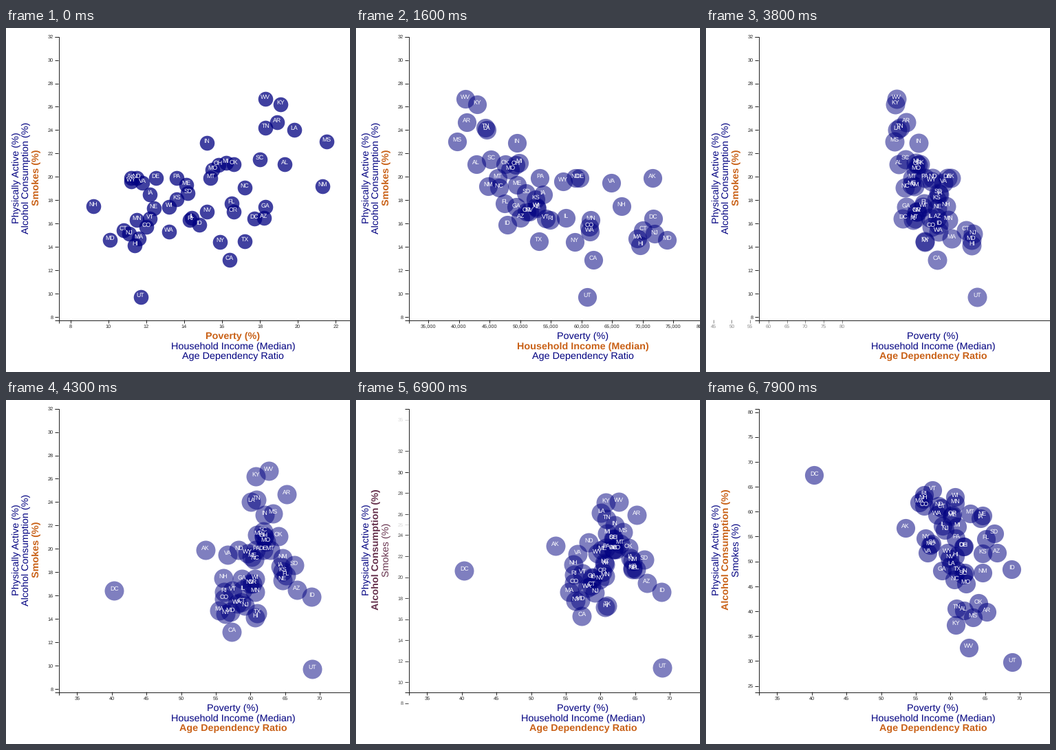
A matplotlib script that plays this animation: 500x500 px, repeating every 8000 ms.

```python
import matplotlib.pyplot as plt
import numpy as np
from matplotlib.animation import FuncAnimation

SIZE, DPI = 500, 100
FRAMES, STEP = 80, 100
PT = 72 / DPI  # points per pixel
LEFT, BOTTOM, TOP, PLOT_W = 76, 424, 12, 508
NAVY = np.array([0, 0, 0.5])
ORANGE = np.array([0.79, 0.38, 0.09])
INK = "#222222"
MOVE, FADE, SETTLE = 1000, 350, 550
TO_INCOME, TO_AGE, TO_ALCOHOL = 424, 3271, 6725
NEVER, ALWAYS = 1e9, -1e9

plt.rcParams["font.family"] = "Liberation Sans"
plt.rcParams["text.hinting"] = "none"

STATES = ("AL AK AZ AR CA CO CT DE DC FL GA HI ID IL IN IA KS KY LA ME MD MA MI MN "
          "MS MO MT NE NV NH NJ NM NY NC ND OH OK OR PA RI SC SD TN TX UT VT VA WA "
          "WV WI WY").split()

poverty = np.array([
    19.3, 11.2, 18.2, 18.9, 16.4, 12, 10.8, 12.5, 17.7, 16.5, 18.3, 11.4, 14.8,
    14.4, 15.2, 12.2, 13.6, 19.1, 19.8, 14.1, 10.1, 11.6, 16.2, 11.5, 21.5, 15.5,
    15.4, 12.4, 15.2, 9.2, 11.1, 21.3, 15.9, 17.2, 11.5, 15.8, 16.6, 16.6, 13.6,
    14.3, 18, 14.2, 18.3, 17.2, 11.7, 12.2, 11.8, 13.2, 18.3, 13.2, 11.2])
income = np.array([
    42830, 71583, 50068, 41262, 61933, 61303, 70048, 59716, 71648, 47463, 49321,
    69592, 47861, 57444, 49446, 53712, 52504, 42958, 44555, 49462, 73971, 69160,
    49847, 61481, 39680, 48363, 46328, 52686, 51450, 66532, 71919, 44803, 58878,
    46556, 59029, 49308, 47529, 51075, 53234, 54891, 45238, 50979, 44361, 53035,
    60922, 54166, 64902, 61366, 41059, 52622, 57055])
age = np.array([
    61.9, 53.5, 66.7, 65.2, 57.3, 56.2, 58.7, 61.8, 40.35, 65.1, 58.8, 60.7, 68.8,
    58.9, 62, 64.3, 64.6, 60.8, 60.1, 60.2, 57.1, 55.5, 61, 60.7, 63.2, 62.2,
    62.8, 64.6, 59.9, 56.1, 59.2, 64.6, 56.4, 60.6, 58.3, 61.9, 64, 60.3, 60.8,
    56.2, 61.8, 66.3, 60.9, 61, 68.9, 57.4, 56.7, 58.1, 62.6, 60.7, 59.6])
smokes = np.array([
    21.1, 19.9, 16.5, 24.7, 12.9, 15.7, 15.4, 19.9, 16.4, 17.7, 17.4, 14.1, 15.9,
    16.5, 22.9, 18.5, 18.1, 26.2, 24, 19.3, 14.6, 14.7, 21.2, 16.3, 23, 20.6,
    19.9, 17.3, 17, 17.5, 15.1, 19.2, 14.4, 19.1, 19.9, 21, 21.1, 17, 19.9,
    16.3, 21.5, 18.6, 24.2, 14.5, 9.7, 16.4, 19.5, 15.3, 26.7, 17.4, 19.6])
alcohol = np.array([
    40.2, 56.7, 51.7, 39.9, 53.6, 61.1, 60.7, 53, 67.3, 54.5, 48.1, 51, 48.5,
    57.2, 47.8, 58.6, 51.6, 37.2, 49.3, 59.1, 53.2, 61.9, 57, 61.7, 38.8, 45.5,
    59.6, 59.2, 50.6, 62.5, 56.3, 47.7, 54.6, 46.3, 61.1, 53, 41.6, 59.3, 54.6,
    63.3, 47.3, 55.6, 40.5, 48.1, 29.8, 64.3, 51.7, 59.4, 32.7, 63, 51.7])


class Scale:
    """Linear scale padded 20% beyond the data, with regular ticks."""

    def __init__(self, data, step, start, end):
        self.data, self.start, self.end = data, start, end
        self.low, self.high = 0.8 * data.min(), 1.2 * data.max()
        first = int(np.ceil(self.low / step)) * step
        self.ticks = set(range(first, int(self.high) + 1, step))

    def __call__(self, value):
        share = (value - self.low) / (self.high - self.low)
        return self.start + share * (self.end - self.start)


def x_scale(data, step):
    return Scale(data, step, LEFT, LEFT + PLOT_W)


def y_scale(data, step):
    return Scale(data, step, BOTTOM, TOP)


by_poverty, by_income, by_age = x_scale(poverty, 2), x_scale(income, 5000), x_scale(age, 5)
by_smokes, by_alcohol = y_scale(smokes, 2), y_scale(alcohol, 5)


def ramp(t, start, duration):
    return min(max((t - start) / duration, 0), 1)


def ease(u):
    return 4 * u**3 if u < 0.5 else 1 - 4 * (1 - u)**3


def mix(a, b, u):
    return a + (b - a) * u


def tick_marks(old, new, u):
    """Yield value, position and opacity of every visible tick."""
    for value in sorted(old.ticks | new.ticks):
        pos = mix(old(value), new(value), u)
        if value in old.ticks and value in new.ticks:
            alpha = 1
        else:
            alpha = u if value in new.ticks else 1 - u
        if alpha > 0 and -20 < pos < SIZE + 20:
            yield value, pos, alpha


fig = plt.figure(figsize=(SIZE / DPI, SIZE / DPI), dpi=DPI, facecolor="white")
ax = fig.add_axes([0, 0, 1, 1])
ax.set(xlim=(0, SIZE), ylim=(SIZE, 0))
ax.axis("off")


def line(xs, ys, **style):
    return ax.plot(xs, ys, lw=PT, solid_capstyle="butt", **{"color": INK, **style})[0]


def text(x, y, string, px, **style):
    style = {"ha": "center", "va": "baseline", **style}
    return ax.text(x, y, string, fontsize=px * PT, **style)


line([LEFT - 5, LEFT + 0.5, LEFT + 0.5, LEFT - 5],
     [TOP + 0.5, TOP + 0.5, BOTTOM + 0.5, BOTTOM + 0.5])
line([LEFT + 0.5, LEFT + 0.5, SIZE], [BOTTOM + 5, BOTTOM + 0.5, BOTTOM + 0.5])

bubbles = ax.scatter(poverty, smokes, linewidths=0, zorder=3)
names = [text(0, 0, s, 8.8, color="white", zorder=4) for s in STATES]
cursor = line([], [], color="#bbbbbb")

# Axis titles with the times at which each becomes active and inactive.
titles = [
    (text(330, 452.5, "Poverty (%)", 14.4), ALWAYS, TO_INCOME),
    (text(330, 467, "Household Income (Median)", 14.4), TO_INCOME, TO_AGE),
    (text(330, 481.3, "Age Dependency Ratio", 14.4), TO_AGE, NEVER),
]
for x, string, on, off in [(18.8, "Physically Active (%)", NEVER, NEVER),
                           (33.3, "Alcohol Consumption (%)", TO_ALCOHOL, NEVER),
                           (47.8, "Smokes (%)", ALWAYS, TO_ALCOHOL)]:
    title = text(x, 217.5, string, 14.4, rotation=90, va="center",
                 rotation_mode="anchor")
    title.set_va("baseline")
    titles.append((title, on, off))

tick_artists = []


def draw_ticks(x_axis, y_axis):
    while tick_artists:
        tick_artists.pop().remove()
    for value, x, alpha in tick_marks(*x_axis):
        tick_artists.append(line([x, x], [BOTTOM, BOTTOM + 5], alpha=alpha))
        tick_artists.append(text(x, BOTTOM + 12.2, f"{value:,}", 7.4, color=INK, alpha=alpha))
    for value, y, alpha in tick_marks(*y_axis):
        tick_artists.append(line([LEFT - 5, LEFT], [y, y], alpha=alpha))
        tick_artists.append(text(LEFT - 7, y + 2.7, f"{value}", 7.4, ha="right",
                                 color=INK, alpha=alpha))


def draw_cursor(t):
    if not 5200 <= t <= 5900:
        cursor.set_data([], [])
        return
    u = ramp(t, 5200, 800)
    x = (1 - u)**2 * 318 + 2 * u * (1 - u) * 150 + u**2 * 22
    y = (1 - u)**2 * 482 + 2 * u * (1 - u) * 540 + u**2 * 292
    cursor.set_data([x, x], [y - 5, y + 5])


def update(frame):
    t = frame * STEP
    if t < TO_AGE:
        x_axis = by_poverty, by_income, ramp(t, TO_INCOME, MOVE)
    else:
        x_axis = by_income, by_age, ramp(t, TO_AGE, MOVE)
    y_axis = by_smokes, by_alcohol, ramp(t, TO_ALCOHOL, MOVE)
    draw_ticks(x_axis, y_axis)

    xs, ys = (mix(old(old.data), new(new.data), u) for old, new, u in (x_axis, y_axis))
    begun = [start for start in (TO_INCOME, TO_AGE, TO_ALCOHOL) if start <= t]
    calm = ease(ramp(t, begun[-1] + MOVE, SETTLE)) if begun else 1
    bubbles.set_offsets(np.column_stack([xs, ys]))
    bubbles.set_sizes([(2 * mix(14, 10.8, calm) * PT)**2])
    bubbles.set_facecolor((*NAVY, mix(0.5, 0.75, calm)))
    for name, x, y in zip(names, xs, ys):
        name.set_position((x, y))

    for title, on, off in titles:
        glow = ramp(t, on, FADE) * (1 - ramp(t, off, FADE))
        title.set_color(mix(NAVY, ORANGE, glow))
        title.set_fontweight("bold" if on <= t < off else "normal")
    draw_cursor(t)
    return []


anim = FuncAnimation(fig, update, frames=FRAMES, interval=STEP, repeat=True,
                     repeat_delay=0, init_func=lambda: [])
plt.show()
```
